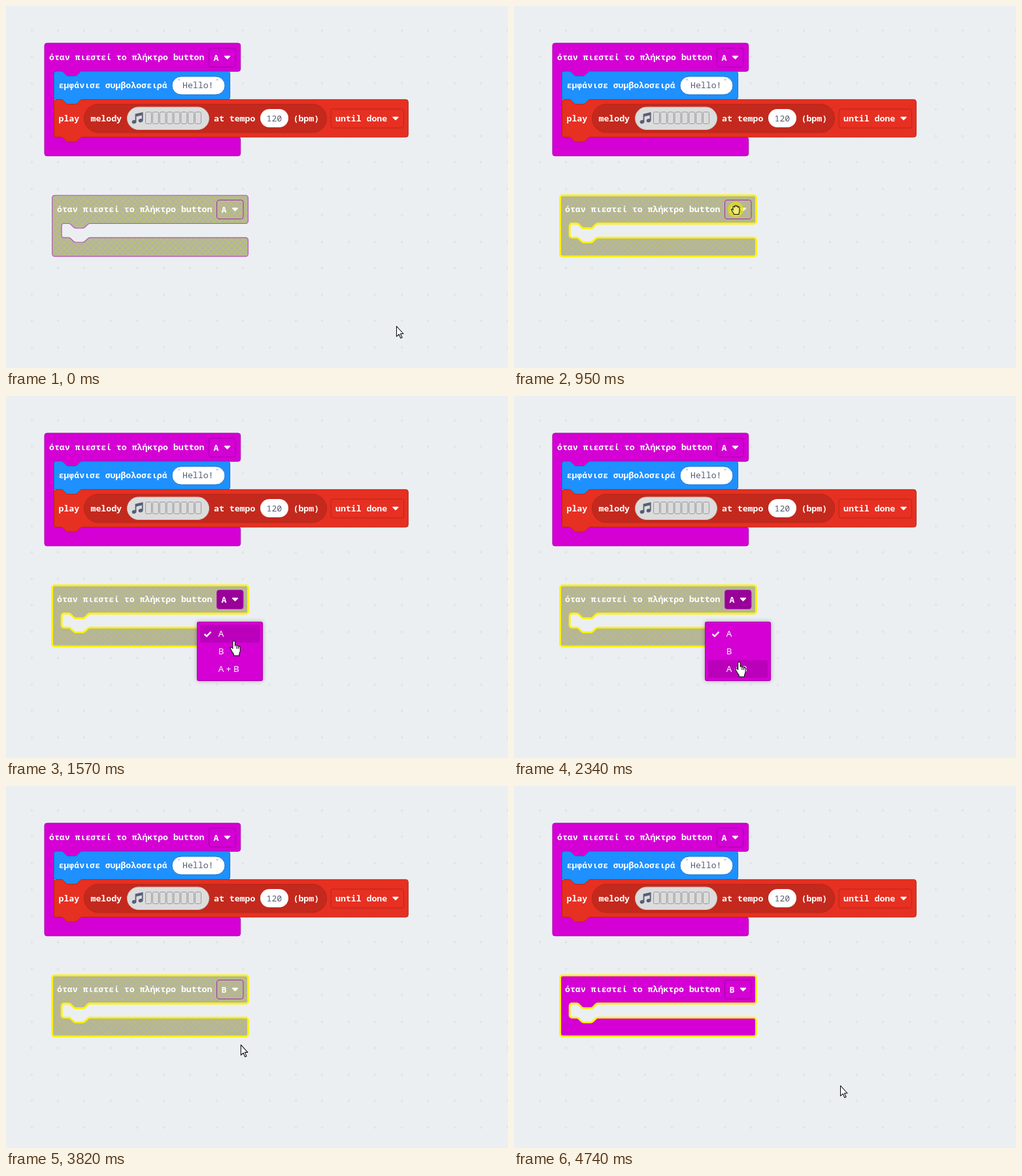
These frames come from a looping animation (768x555 px, 5.07 s). An HTML page with a canvas:

```html
<!DOCTYPE html>
<html lang="el">
<head>
<meta charset="utf-8">
<title>Block editor</title>
<style>
html, body { margin: 0; width: 100%; height: 100%; overflow: hidden; background: #ebeff2; }
canvas { display: block; }
</style>
</head>
<body>
<canvas id="stage" width="768" height="555"></canvas>
<script>
const ctx = document.getElementById('stage').getContext('2d');
const LOOP = 5070, SCALE = 0.9;
const MONO = '"Noto Sans Mono", "DejaVu Sans Mono", monospace';
const SANS = '"Noto Sans", "Open Sans", sans-serif';
const MAGENTA = '#d400d4', MAGENTA_DARK = '#aa00aa', SLATE = '#575e75';

// Connector bumps, drawn rightwards and leftwards, in block units
const BUMP_R = 'c2 0 3 1 4 2l4 4c1 1 2 2 4 2h12c2 0 3-1 4-2l4-4c1-1 2-2 4-2';
const BUMP_L = 'c-2 0-3 1-4 2l-4 4c-1 1-2 2-4 2h-12c-2 0-3-1-4-2l-4-4c-1-1-2-2-4-2';
const TR = 'a4 4 0 0 1 4 4', BR = 'a4 4 0 0 1-4 4', BL = 'a4 4 0 0 1-4-4';

function eventShape(w, gap) {
  return new Path2D(`M0 4a4 4 0 0 1 4-4H${w - 4}${TR}V44${BR}H64${BUMP_L}h-8a4 4 0 0 0-4 4` +
    `v${gap - 8}a4 4 0 0 0 4 4h8${BUMP_R}H${w - 4}${TR}v24${BR}H4${BL}z`);
}
function statementShape(w, h) {
  return new Path2D(`M0 4a4 4 0 0 1 4-4h8${BUMP_R}H${w - 4}${TR}V${h - 4}${BR}H48${BUMP_L}h-8${BL}z`);
}

const SHAPES = {
  full: eventShape(333, 112),
  empty: eventShape(333, 24),
  show: statementShape(299, 48),
  play: statementShape(602, 64)
};
const CURSORS = {
  arrow: new Path2D('M.5.5V16.2l3.7-3.4 2.6 6 2.3-1-2.6-5.8H11z'),
  grab: new Path2D('M-4 1V-3.5a1.25 1.25 0 0 1 2.5 0V-5a1.25 1.25 0 0 1 2.5 0V-4.5a1.25 1.25 0 0 1 2.5 0' +
    'V-3a1.25 1.25 0 0 1 2.5 0V2q0 2.5-1 4V7.5H-2.5Q-3 5-6 1.5q-1-1.4.3-2T-4 1z'),
  point: new Path2D('M-1.7 11.5V1.6a1.75 1.75 0 0 1 3.5 0V7.5a1.35 1.35 0 0 1 2.7 0V8.2a1.3 1.3 0 0 1 2.6 0' +
    'V9.5a1.3 1.3 0 0 1 2.6 0V14.5q0 2.5-1.4 4.5V22.5H-.2V20Q-2 18-4 14-6.2 11-5.2 10T-1.7 11.5z')
};
const KNUCKLES = new Path2D('M4.5 8v4M7.1 9v3');

// Pointer moves: start, step count, step length, end point, ease-out power, optional bend
const START = [597, 490.5];
const MOVES = [
  { at: 70, n: 8, dt: 65.7, to: [346, 319], pow: 1, bend: [400, 385] },
  { at: 600, n: 4, dt: 70, to: [339, 312], pow: 1 },
  { at: 1150, n: 8, dt: 70, to: [349, 378], pow: 1.6 },
  { at: 1710, n: 1, dt: 70, to: [347, 382], pow: 1 },
  { at: 2060, n: 7, dt: 70, to: [344, 412], pow: 1.6 },
  { at: 2610, n: 4, dt: 70, to: [344, 391], pow: 1.6 },
  { at: 3820, n: 8, dt: 70, to: [463, 434], pow: 1 },
  { at: 4380, n: 6, dt: 72, to: [499, 459], pow: 1.5 }
];

function pointerAt(t) {
  let pos = START;
  for (const m of MOVES) {
    if (t < m.at) break;
    const p = Math.min(1, (Math.floor((t - m.at) / m.dt) + 1) / m.n);
    const e = 1 - Math.pow(1 - p, m.pow);
    const from = pos;
    pos = from.map((a, i) => {
      const c = m.bend ? m.bend[i] : (a + m.to[i]) / 2;
      return (1 - e) * (1 - e) * a + 2 * e * (1 - e) * c + e * e * m.to[i];
    });
  }
  return pos;
}

function makeHatch(line) {
  const tile = document.createElement('canvas');
  tile.width = tile.height = 9;
  const c = tile.getContext('2d');
  c.fillStyle = '#b3b4a3';
  c.fillRect(0, 0, 9, 9);
  c.strokeStyle = line;
  c.lineWidth = 1;
  c.beginPath();
  c.moveTo(-1, -1); c.lineTo(10, 10);
  c.moveTo(10, -1); c.lineTo(-1, 10);
  c.stroke();
  const pattern = ctx.createPattern(tile, 'repeat');
  pattern.setTransform(new DOMMatrix([1 / SCALE, 0, 0, 1 / SCALE, 0, 0]));
  return pattern;
}
const HATCH = makeHatch('#c8cb4c'), HATCH_DIM = makeHatch('#c3c25c');

function block(shape, x, y, fill, stroke, width = 1) {
  ctx.save();
  ctx.translate(x, y);
  ctx.scale(SCALE, SCALE);
  ctx.lineJoin = 'round';
  ctx.fillStyle = fill;
  ctx.fill(shape);
  ctx.strokeStyle = stroke;
  ctx.lineWidth = width / SCALE;
  ctx.stroke(shape);
  ctx.restore();
}

function box(x, y, w, h, r, fill, stroke) {
  ctx.beginPath();
  ctx.roundRect(x, y, w, h, r);
  if (fill) { ctx.fillStyle = fill; ctx.fill(); }
  if (stroke) { ctx.strokeStyle = stroke; ctx.lineWidth = 1; ctx.stroke(); }
}

function label(str, x, y, color = '#fff', font = `bold 13.2px ${MONO}`) {
  ctx.font = font;
  ctx.fillStyle = color;
  ctx.fillText(str, x, y);
}

function caret(x, y) {
  ctx.fillStyle = ctx.strokeStyle = '#fff';
  ctx.lineWidth = 1.4;
  ctx.lineJoin = 'round';
  ctx.beginPath();
  ctx.moveTo(x - 4, y - 2);
  ctx.lineTo(x + 4, y - 2);
  ctx.lineTo(x, y + 2);
  ctx.closePath();
  ctx.fill();
  ctx.stroke();
}

function dropdown(x, y, w, text, fill, stroke) {
  box(x, y, w, 29, 3.5, fill, stroke);
  label(text, x + 7, y + 19);
  caret(x + w - 12.5, y + 14.5);
}

function grid() {
  ctx.fillStyle = '#dde2e6';
  for (let x = 38.5; x < 770; x += 40.45) {
    for (let y = 36.5; y < 555; y += 40.5) {
      const gx = Math.round(x), gy = Math.round(y);
      ctx.fillRect(gx - 2, gy, 5, 1);
      ctx.fillRect(gx, gy - 2, 1, 5);
    }
  }
}

function note() {
  ctx.fillStyle = SLATE;
  for (const [x, y] of [[196, 177.6], [206, 175.6]]) {
    ctx.beginPath();
    ctx.ellipse(x, y, 3.4, 2.7, -0.25, 0, 7);
    ctx.fill();
  }
  ctx.beginPath();
  ctx.moveTo(197.6, 177.5);
  ctx.lineTo(197.6, 165.5);
  ctx.lineTo(209.6, 162.8);
  ctx.lineTo(209.6, 175.5);
  ctx.lineTo(207.8, 175.5);
  ctx.lineTo(207.8, 167.4);
  ctx.lineTo(199.4, 169.4);
  ctx.lineTo(199.4, 177.5);
  ctx.fill();
}

function program() {
  const value = `500 13.2px ${MONO}`;
  block(SHAPES.full, 59, 57, MAGENTA, MAGENTA_DARK);
  label('όταν πιεστεί το πλήκτρο button', 66, 83);
  dropdown(310.5, 64.5, 40.5, 'A', null, MAGENTA_DARK);

  block(SHAPES.show, 73.5, 100.2, '#1e90ff', '#1873cc');
  label('εμφάνισε συμβολοσειρά', 80.5, 126);
  box(254, 108, 81, 28, 14, '#fff', '#1873cc');
  label('"', 262, 119, '#a08cae', `9px ${MONO}`);
  label('"', 320.5, 119, '#a08cae', `9px ${MONO}`);
  label('Hello!', 270, 126, SLATE, value);

  block(SHAPES.play, 73.5, 143.4, '#e63022', '#b8261b');
  label('play', 80.5, 177);
  box(119.5, 150.5, 371, 43.5, 21.7, '#c4291d', '#b8261b');
  label('melody', 129.5, 177);
  box(185.5, 155, 125, 34.5, 17.2, '#dcdcdc', '#cfc4c4');
  note();
  for (let i = 0; i < 8; i++) box(213.5 + i * 10.85, 162.5, 9, 18, 2, null, '#98999f');
  label('at tempo', 318, 177);
  box(389, 158, 43, 28, 14, '#fff');
  label('120', 398.5, 177, SLATE, value);
  label('(bpm)', 439.5, 177);
  dropdown(497, 158, 111.5, 'until done', null, '#b8261b');
}

function secondBlock(t) {
  const hover = t >= 600, enabled = t >= 4030, open = t >= 1080 && t < 3350;
  const fill = enabled ? MAGENTA : hover ? HATCH_DIM : HATCH;
  block(SHAPES.empty, 70.7, 290.3, fill, hover ? '#fff200' : '#b44db4', hover ? 2.8 : 1.1);
  label('όταν πιεστεί το πλήκτρο button', 78, 316);
  dropdown(322.5, 297.5, 40.5, t < 3350 ? 'A' : 'B', open ? '#990099' : null,
    enabled ? MAGENTA_DARK : '#a52ca5');
}

function menu(t, [, py]) {
  if (t < 1080 || t >= 3420) return;
  const opening = t < 1150, closing = t >= 3350;
  ctx.save();
  ctx.globalAlpha = opening || closing ? 0.4 : 1;
  if (opening) ctx.translate(0, -17);
  ctx.shadowColor = 'rgba(0,0,0,.3)';
  ctx.shadowBlur = 6;
  box(292, 346, 101, 91, 3, MAGENTA);
  ctx.shadowColor = 'transparent';
  box(292.5, 346.5, 100, 90, 3, null, MAGENTA_DARK);
  const row = Math.max(0, Math.min(2, Math.floor((py - 351) / 27)));
  if (!opening) box(297, 351 + row * 27, 91, 27, 3, '#ba00ba');
  ['A', 'B', 'A + B'].forEach((s, i) => label(s, 324.7, 369 + i * 27, '#fff', `13.4px ${SANS}`));
  ctx.strokeStyle = '#fff';
  ctx.lineWidth = 2.4;
  ctx.lineJoin = 'miter';
  ctx.beginPath();
  ctx.moveTo(303.5, 365);
  ctx.lineTo(307, 368.4);
  ctx.lineTo(313.5, 361.6);
  ctx.stroke();
  ctx.restore();
}

function pointer(t, [x, y]) {
  const click = (t >= 880 && t < 1080) || (t >= 3080 && t < 3150);
  let kind = 'arrow';
  if (t >= 600 && t < 3350) kind = y < 334 ? 'grab' : y > 346 ? 'point' : 'arrow';
  if (click) {
    ctx.fillStyle = 'rgba(226,222,30,.75)';
    ctx.beginPath();
    ctx.arc(x, y, 12, 0, 7);
    ctx.fill();
  }
  ctx.save();
  ctx.translate(x, y);
  ctx.lineJoin = 'round';
  ctx.lineWidth = 1.1;
  ctx.strokeStyle = '#111';
  ctx.fillStyle = click && kind === 'grab' ? '#efec78' : '#fff';
  ctx.fill(CURSORS[kind]);
  ctx.stroke(CURSORS[kind]);
  if (kind === 'point') ctx.stroke(KNUCKLES);
  ctx.restore();
}

function draw(t) {
  const pos = pointerAt(t);
  ctx.fillStyle = '#ebeff2';
  ctx.fillRect(0, 0, 768, 555);
  grid();
  program();
  secondBlock(t);
  menu(t, pos);
  pointer(t, pos);
}

function tick() {
  draw(performance.now() % LOOP);
  requestAnimationFrame(tick);
}
tick();
</script>
</body>
</html>
```
